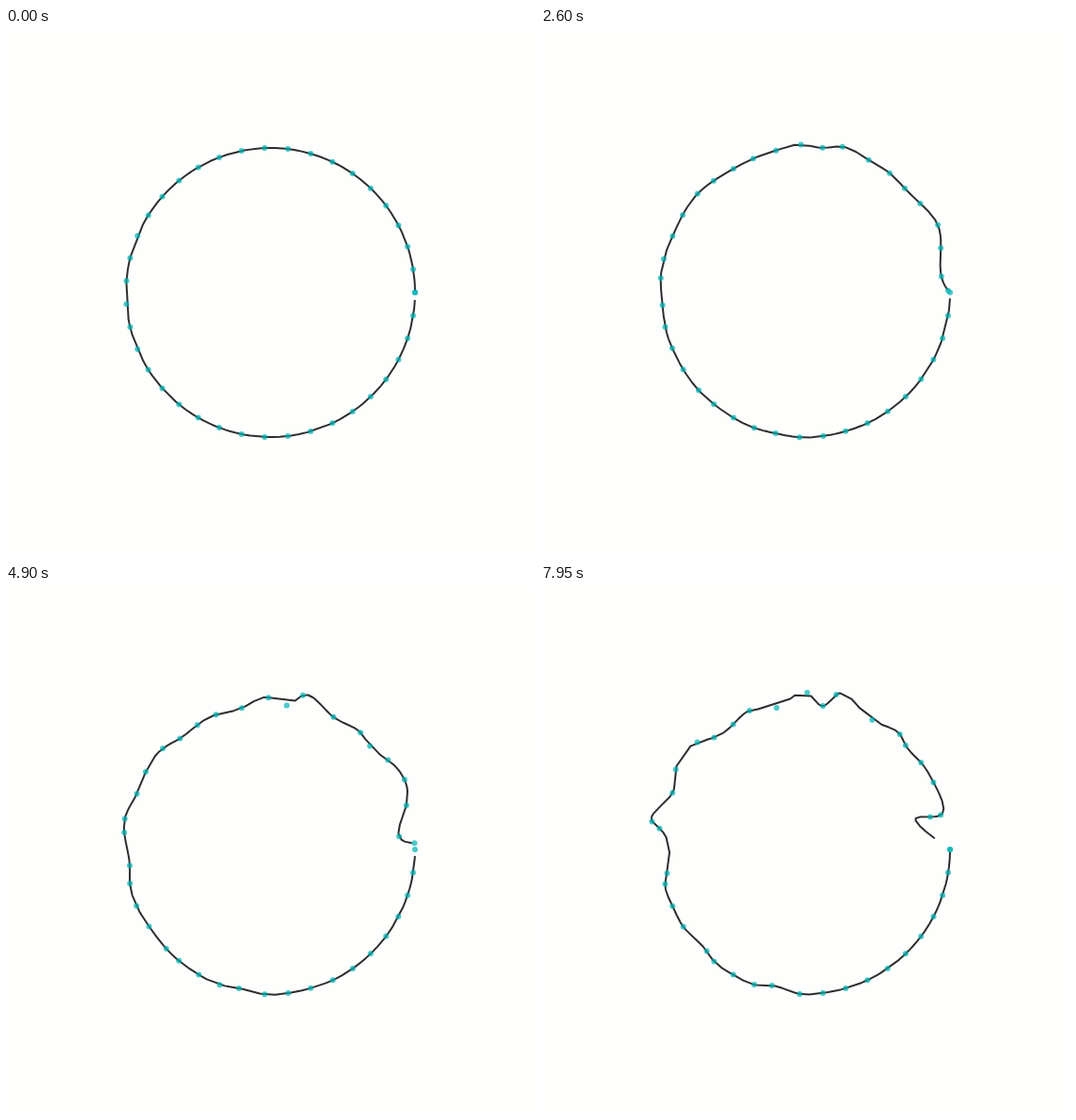
Animation, 560 px wide and 560 px high, one loop 8000 ms. Source, as an HTML page with a canvas:

```html
<!DOCTYPE html>
<html lang="en">
<head>
<meta charset="utf-8">
<title>Drifting spline</title>
<style>
  html, body { margin: 0; width: 100%; height: 100%; overflow: hidden; background: #fefefd; }
  canvas { display: block; width: 560px; height: 560px; }
</style>
</head>
<body>
<canvas id="stage" width="560" height="560"></canvas>
<script>
const ctx = document.getElementById('stage').getContext('2d');
const SIZE = 560, CENTER = 280, RADIUS = 153;
const COUNT = 40, STEPS = 160, STEP_MS = 50, SAMPLES = 160;

// How far the restless dots end up from the circle; all others stay close to it.
const drifts = {
  11: [-5, -6], 15: [10, 6], 19: [6, 13], 20: [-2, -10], 21: [-14, 7], 23: [-8, -3], 24: [0, -12],
  27: [-5, -4], 29: [8, -13], 31: [-10, -17], 32: [5, 1], 33: [13, 4], 37: [-2, 12], 38: [-19, -10]
};
// Turning points on the way: step, dx, dy.
const detours = { 31: [141, -16, -25], 38: [78, -12, 16] };

function seeded(seed) {
  return () => {
    seed = (seed + 0x6D2B79F5) | 0;
    let t = Math.imul(seed ^ (seed >>> 15), 1 | seed);
    t = (t + Math.imul(t ^ (t >>> 7), 61 | t)) ^ t;
    return ((t ^ (t >>> 14)) >>> 0) / 4294967296;
  };
}

// A random walk along an eased drift; dots further round the circle shake more.
function makeTrack(i) {
  const angle = i / (COUNT - 1) * 2 * Math.PI;
  const home = { x: CENTER + RADIUS * Math.cos(angle), y: CENTER + RADIUS * Math.sin(angle) };
  const keys = [[0, 0, 0], [STEPS - 1, ...(drifts[i] || [0, 0])]];
  if (detours[i]) keys.splice(1, 0, detours[i]);

  const random = seeded(1000 + i * 77), reach = 0.25 * (i / 25) ** 1.5;
  const walk = [[0, 0]];
  for (let s = 1; s < STEPS; s++) {
    const a = random() * 2 * Math.PI, [x, y] = walk[s - 1];
    walk.push([x + reach * Math.cos(a), y + reach * Math.sin(a)]);
  }
  const end = walk[STEPS - 1];

  return walk.map((shake, s) => {
    const next = Math.max(1, keys.findIndex(key => key[0] >= s));
    const from = keys[next - 1], to = keys[next];
    const eased = ((s - from[0]) / (to[0] - from[0])) ** 1.5;
    const offset = axis => from[axis + 1] + (to[axis + 1] - from[axis + 1]) * eased
      + shake[axis] - end[axis] * s / (STEPS - 1);
    return { x: home.x + offset(0), y: home.y + offset(1) };
  });
}

const tracks = Array.from({ length: COUNT }, (_, i) => makeTrack(i));

// Cubic spline with not-a-knot ends: second derivatives at the knots.
function curvature(v, h) {
  const n = h.length, diag = [], upper = [], right = [], m = [];
  const r0 = h[0] / h[1], r1 = h[n - 1] / h[n - 2];
  for (let i = 1; i < n; i++) {
    let lower = h[i - 1];
    diag[i] = 2 * (h[i - 1] + h[i]);
    upper[i] = h[i];
    right[i] = 6 * ((v[i + 1] - v[i]) / h[i] - (v[i] - v[i - 1]) / h[i - 1]);
    if (i === 1) {
      diag[i] += h[0] * (1 + r0);
      upper[i] -= h[0] * r0;
      continue;
    }
    if (i === n - 1) {
      diag[i] += h[i] * (1 + r1);
      lower -= h[i] * r1;
    }
    const f = lower / diag[i - 1];
    diag[i] -= f * upper[i - 1];
    right[i] -= f * right[i - 1];
  }
  m[n - 1] = right[n - 1] / diag[n - 1];
  for (let i = n - 2; i > 0; i--) m[i] = (right[i] - upper[i] * m[i + 1]) / diag[i];
  m[0] = (1 + r0) * m[1] - r0 * m[2];
  m[n] = (1 + r1) * m[n - 1] - r1 * m[n - 2];
  return m;
}

function makeSpline(dots) {
  const h = [], knots = [0];
  for (let i = 1; i < dots.length; i++) {
    h.push(Math.hypot(dots[i].x - dots[i - 1].x, dots[i].y - dots[i - 1].y));
    knots.push(knots[i - 1] + h[i - 1]);
  }
  const total = knots[h.length];
  const makeAxis = v => {
    const m = curvature(v, h);
    return (i, t) => {
      const a = knots[i + 1] - t, b = t - knots[i], w = h[i];
      return (m[i] * a ** 3 + m[i + 1] * b ** 3) / (6 * w)
        + (v[i] / w - m[i] * w / 6) * a + (v[i + 1] / w - m[i + 1] * w / 6) * b;
    };
  };
  const x = makeAxis(dots.map(d => d.x)), y = makeAxis(dots.map(d => d.y));
  return u => {
    const t = u * total;
    let i = 0;
    while (i < h.length - 1 && knots[i + 1] < t) i++;
    return [x(i, t), y(i, t)];
  };
}

function draw(step) {
  const dots = tracks.map(track => track[step]);
  const spline = makeSpline(dots), random = seeded(step * 7919 + 5);
  ctx.fillStyle = '#fefefd';
  ctx.fillRect(0, 0, SIZE, SIZE);

  // The line joins randomly placed samples, so it cuts some corners.
  const samples = Array.from({ length: SAMPLES }, random).sort((a, b) => a - b);
  ctx.beginPath();
  samples.forEach(u => ctx.lineTo(...spline(u)));
  ctx.strokeStyle = 'rgba(0, 0, 0, 0.82)';
  ctx.lineWidth = 2;
  ctx.lineJoin = 'round';
  ctx.stroke();

  ctx.fillStyle = 'rgba(0, 178, 178, 0.7)';
  for (const { x, y } of dots) {
    ctx.beginPath();
    ctx.arc(x, y, 3, 0, 2 * Math.PI);
    ctx.fill();
  }
}

const start = performance.now();
let shown = -1;
function tick() {
  const step = Math.floor((performance.now() - start) / STEP_MS) % STEPS;
  if (step !== shown) draw(shown = step);
  requestAnimationFrame(tick);
}
tick();
</script>
</body>
</html>
```
